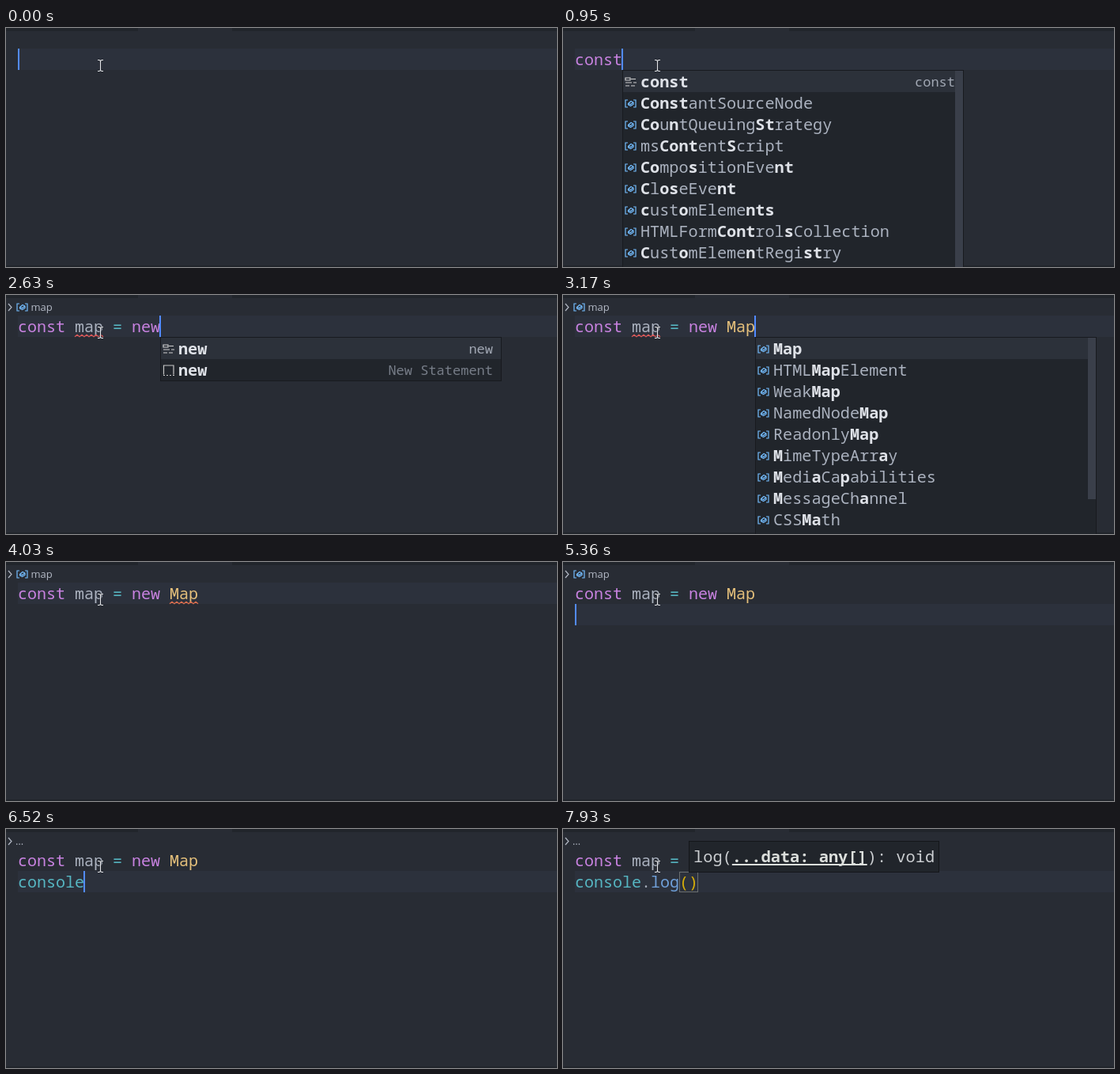
An HTML page with a canvas that plays this animation: 697 px wide and 302 px high, repeating every 8000 ms.

```html
<!DOCTYPE html>
<html lang="en">
<meta charset="utf-8">
<title>Code editor typing</title>
<style>
  html, body { margin: 0; width: 100%; height: 100%; overflow: hidden; background: #282c34; }
  canvas { display: block; }
</style>
<canvas width="697" height="302"></canvas>
<script>
const ctx = document.querySelector('canvas').getContext('2d');
const MONO = '"Noto Sans Mono", "DejaVu Sans Mono", monospace';
const LEFT = 15, TOP = 26, ROW = 27, CHAR = 12, DURATION = 8000;
const GREY = '#abb2bf', PURPLE = '#c882e0', TEAL = '#56b6c2', YELLOW = '#e5c07b', BLUE = '#6f9fd8';
const COLORS = { const: PURPLE, new: PURPLE, '=': TEAL, console: TEAL, '()': '#d9b008' };

// Suggestions: # keyword, ~ snippet, ! method; [matched] letters; detail after the bar.
const LISTS = {
  co: '[co]nsole #[co]nst #[co]ntinue [co]nfirm [Co]mment [Co]untQueuingStrategy [Co]mpositionEvent [co]okieStore [Co]nvolverNode',
  con: '[con]sole #[con]st #[con]tinue [con]firm [Con]stantSourceNode [Con]volverNode [Co]u[n]tQueuingStrategy ms[Con]tentScript [Co]mpositio[n]Event',
  cons: '[cons]ole #[cons]t [Cons]tantSourceNode [Co]u[n]tQueuing[S]trategy ms[Con]tent[S]cript [Co]mpo[s]itio[n]Event [C]l[os]eEve[n]t HTMLForm[Con]trol[s]Collection [c]ust[o]mEleme[ns]',
  const: '#[const]|const [Const]antSourceNode [Co]u[n]tQueuing[St]rategy ms[Cont]ent[S]cript [Co]mpo[s]itionEve[nt] [C]l[os]eEve[nt] [c]ust[o]mEleme[nts] HTMLForm[Cont]rol[s]Collection [C]ust[o]mEleme[n]tRegi[st]ry',
  m: '[m]atchMedia [m]enubar [m]oveBy [m]oveTo [M]ap [M]ath [M]ediaList [M]essageEvent [M]imeType',
  map: '[Map] HTML[Map]Element Weak[Map] [M]imeTypeArr[a]y [m]s[A]ttribute[P]atch [M]essageCh[a]nnel[P]ort HTML[M]et[a]Element [M]edi[a]Ca[p]abilities [m]atchMedi[a]',
  n: '#[n]ew [n]ame [n]avigator #[n]ull [N]aN [N]amedNodeMap [N]ode [N]odeFilter [N]odeList',
  ne: '#[ne]w ~[ne]w [n]am[e] [N]od[e] [N]um[be]r [N]od[e]Filter [N]od[e]List [N]avigator [N]otification',
  new: '#[new]|new ~[new]|New_Statement',
  Map: '[Map] HTML[Map]Element Weak[Map] NamedNode[Map] Readonly[Map] [M]imeTypeArr[a]y [M]edi[a]Ca[p]abilities [M]essageCh[a]nnel CSS[Ma]th',
  conso: '[conso]le #[cons]t [Cons]tantS[o]urceNode [Co]mpo[s]iti[on]Event HTMLForm[Con]trol[s]C[o]llection [c]u[s]t[o]mElements',
  '.': '!assert !clear !count !countReset !debug !dir !dirxml !error !group',
  l: '![l]og !c[l]ear !tab[l]e !dirxm[l] !profi[l]e !profi[l]eEnd !groupCo[l]lapsed !time[l]og',
};
LISTS.mapDetail = LISTS.Map.replace('[Map]', '[Map]|var_Map:_MapConstructor');

const DECL = 'const map = new ';
const STEPS = [
  [0, { lines: [''], caret: 1 }],
  [130, { caret: 0 }],
  [400, { lines: ['c'], caret: 1 }],
  [470, { lines: ['co'] }],
  [540, { list: 'co' }],
  [680, { lines: ['con'], list: 'con' }],
  [750, { lines: ['cons'], list: 'cons' }],
  [950, { lines: ['const'], list: 'const' }],
  [1280, { lines: ['const '], list: '' }],
  [1350, { lines: ['const m'] }],
  [1420, { list: 'm' }],
  [1490, { lines: ['const ma'] }],
  [1620, { lines: ['const map'] }],
  [1690, { list: 'map' }],
  [2020, { lines: ['const map '], list: '' }],
  [2090, { crumb: 'map', squiggle: 6 }],
  [2160, { lines: ['const map ='] }],
  [2290, { lines: ['const map = '] }],
  [2360, { lines: ['const map = n'] }],
  [2430, { list: 'n' }],
  [2500, { lines: ['const map = ne'], list: 'ne' }],
  [2630, { lines: ['const map = new'], list: 'new' }],
  [2760, { lines: [DECL], list: '' }],
  [2890, { lines: [DECL + 'M'] }],
  [2960, { list: 'm' }],
  [3030, { lines: [DECL + 'Ma'] }],
  [3100, { lines: [DECL + 'Map'] }],
  [3170, { list: 'Map' }],
  [3500, { list: 'mapDetail' }],
  [3630, { squiggle: 16 }],
  [3830, { caret: 0 }],
  [4030, { list: '' }],
  [4100, { caret: 1 }],
  [4430, { squiggle: 0 }],
  [4630, { caret: 0 }],
  [5090, { caret: 1 }],
  [5360, { lines: [DECL + 'Map', ''] }],
  [5770, { lines: [DECL + 'Map', 'c'], crumb: '…' }],
  [5840, { lines: [DECL + 'Map', 'co'] }],
  [5910, { list: 'co' }],
  [6050, { lines: [DECL + 'Map', 'cons'], list: 'cons' }],
  [6120, { lines: [DECL + 'Map', 'conso'] }],
  [6190, { list: 'conso' }],
  [6520, { lines: [DECL + 'Map', 'console'], list: '' }],
  [6590, { lines: [DECL + 'Map', 'console.'] }],
  [6720, { list: '.' }],
  [6860, { lines: [DECL + 'Map', 'console.l'] }],
  [6930, { list: 'l' }],
  [7330, { lines: [DECL + 'Map', 'console.log'], list: '' }],
  [7400, { lines: [DECL + 'Map', 'console.log()'] }],
  [7470, { hint: 1 }],
  [7800, { call: 1 }],
  [7930, { caret: 0 }],
];

function rect(x, y, w, h, color) {
  ctx.fillStyle = color;
  ctx.fillRect(x, y, w, h);
}
function frame(x, y, w, h, color) {
  ctx.strokeStyle = color;
  ctx.lineWidth = 1;
  ctx.strokeRect(x + .5, y + .5, w - 1, h - 1);
}
function text(str, x, y, color, size = 20, weight = 400, family = MONO) {
  ctx.font = `${weight} ${size}px ${family}`;
  ctx.fillStyle = color;
  ctx.fillText(str, x, y);
  return x + ctx.measureText(str).width;
}
function stroke(path, x, y, color, width = 1.2) {
  ctx.save();
  ctx.translate(x, y);
  ctx.strokeStyle = color;
  ctx.lineWidth = width;
  ctx.stroke(new Path2D(path));
  ctx.restore();
}

// Icons are 15 wide and centred on y.
const ICONS = {
  '': ['M4 -4.5H1V4.5H4M11 -4.5H14V4.5H11M4.5 0L8 -3L11 -1.5V1L7.5 3L4.5 1.5ZM4.5 0L7.5 1L11 -1.5', '#75beff'],
  '#': ['M1 -5.5H7V-2.5H1ZM8 -4H14M1 .5H9M11 .5H15M1 4.5H6M8 4.5H13', '#d0d0d0'],
  '~': ['M1.5 5V-6.5H14V5M1 6H3M5 6H7M9 6H11M13 6H15', '#c5c5c5'],
  '!': ['M2 -3L8 -6L13 -3V3L7 6L2 3ZM2 -3L7 0L13 -3M7 0V6', '#b180d7'],
};
const icon = (kind, x, y) => stroke(ICONS[kind][0], x, y, ICONS[kind][1]);

function drawCode(line, row, called) {
  let col = 0;
  for (const word of line.match(/\w+|\(\)|\W/g) || []) {
    const color = word === 'log' ? (called ? BLUE : TEAL) : /^M/.test(word) ? YELLOW : COLORS[word] || GREY;
    const x = LEFT + col * CHAR, y = TOP + row * ROW;
    if (word === '()') frame(x, y + 1, 2 * CHAR, ROW - 1, '#6b6f70');
    text(word, x, y + 21, color);
    col += word.length;
  }
}

function drawList(name, x, y) {
  const items = LISTS[name].split(' ');
  const scrolls = items.length > 2;
  const height = scrolls ? 12 * ROW + 2 : items.length * ROW + 2;
  rect(x, y, 432, height, '#21252b');
  rect(x + 1, y + 1, 430, ROW, '#2c313a');
  items.forEach((item, i) => {
    const [, kind, label, detail = ''] = item.match(/^([#~!]?)([^|]*)\|?(.*)$/);
    const top = y + 1 + i * ROW;
    icon(kind, x + 3, top + 14.5);
    let pen = x + 23;
    label.split(/[[\]]/).forEach((part, k) => {
      pen = text(part, pen, top + 21, k % 2 ? '#dfe2e8' : GREY, 20.2, k % 2 ? 700 : 400);
    });
    ctx.textAlign = 'right';
    text(detail.replace(/_/g, ' '), x + 421, top + 20, i ? '#777d88' : '#a2a8b4', 17);
    ctx.textAlign = 'left';
  });
  if (scrolls) rect(x + 421, y + 1, 11, name === 'const' ? 260 : 204, '#3a3f4a');
  frame(x, y, 432, height, '#181a1f');
}

function drawHint() {
  rect(159, 15, 317, 40, '#21252b');
  frame(159, 15, 317, 40, '#14161a');
  const start = text('log(', 165, 42, '#cccfd2', 20.35);
  const end = text('...data: any[]', start, 42, '#dcdfdc', 20.35, 700);
  rect(start, 44, end - start, 2, '#dcdfdc');
  text('): void', end, 42, '#cccfd2', 20.35);
}

function drawSquiggle(col) {
  let path = 'M0 2.5';
  for (let i = 1; i <= 12; i++) path += `L${i * 3} ${i % 2 ? 0 : 2.5}`;
  stroke(path, LEFT + col * CHAR, 50.2, col > 6 ? '#e0704f' : '#e05a5a');
}

function drawCrumb(label) {
  stroke('M0 0L4 4.5L0 9', 3, 11, '#b4bac6');
  if (label === 'map') icon('', 13, 15.5);
  text(label, label === 'map' ? 31.5 : 12, 20, '#b4bac6', 13, 400, '"Open Sans", "Noto Sans", sans-serif');
}

function drawPointer() {
  const shape = 'M-3 .5H-1L.5 1.5L2 .5H4M.5 1.5V13.5M-3 14.5H-1L.5 13.5L2 14.5H4';
  stroke(shape, 119, 40, '#23272e', 2);
  stroke(shape, 119, 40, '#e4e6ea', 1.1);
}

function draw(time) {
  const state = {};
  for (const [start, change] of STEPS) if (start <= time) Object.assign(state, change);
  const row = state.lines.length - 1;
  const y = TOP + row * ROW, x = LEFT + state.lines[row].length * CHAR;
  const caretX = state.lines[row].endsWith(')') ? x - CHAR : x;

  rect(0, 0, 697, 302, '#282c34');
  rect(0, 0, 167, 4, '#21252b');
  rect(286, 0, 411, 4, '#21252b');
  rect(0, 300, 697, 2, '#21252b');
  rect(LEFT, y, 682, ROW, '#2c313c');
  if (state.crumb) drawCrumb(state.crumb);
  state.lines.forEach((line, i) => drawCode(line, i, state.call));
  if (state.squiggle) drawSquiggle(state.squiggle);
  if (state.caret) rect(caretX - (caretX > LEFT ? 1 : 0), y, 2, ROW, '#528bff');
  if (state.list) drawList(state.list, x, y + ROW);
  if (state.hint) drawHint();
  drawPointer();
}

function tick() {
  draw(performance.now() % DURATION);
  requestAnimationFrame(tick);
}
tick();
</script>
</html>
```
